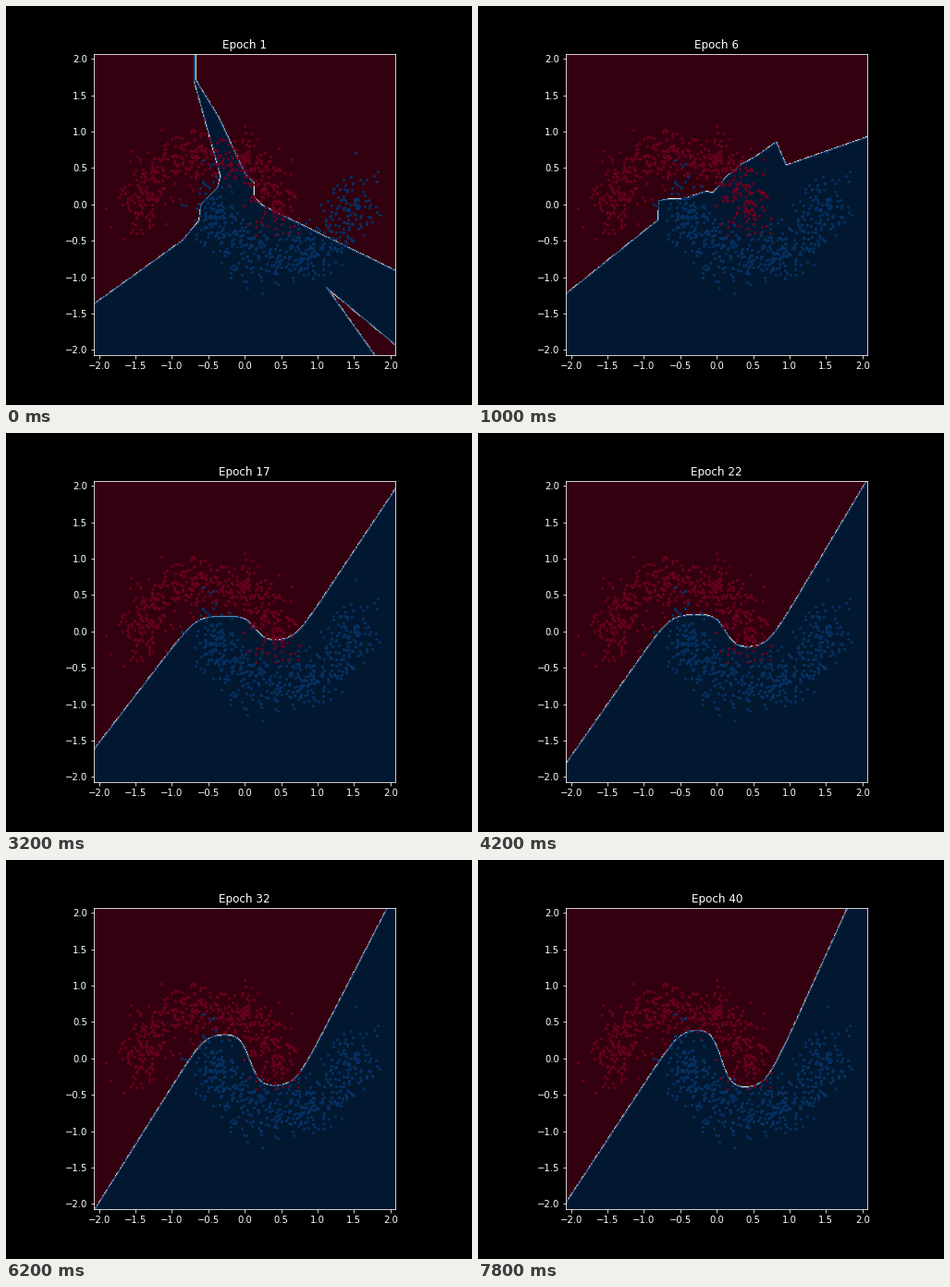
A matplotlib script that plays this animation: 504x432 px, repeating every 8000 ms.

```python
import numpy as np
import matplotlib.pyplot as plt
from matplotlib.animation import FuncAnimation

W, H, DPI = 504, 432, 72
LEFT, BOTTOM, SIDE = 95.2, 54.2, 326
LIM = 2.07
EPOCHS = 40

axis = np.linspace(-LIM, LIM, 415)
gx, gy = np.meshgrid(axis, axis)


def through(v, *points):
    """Piecewise linear function through (input, output) points."""
    return np.interp(v, *zip(*points))


# Every field is positive where the blue class is predicted.
def spike_field():
    left = through(gy, (-1.37, -2.07), (-0.5, -0.86), (-0.23, -0.63),
                   (0, -0.6), (0.24, -0.37), (0.39, -0.33), (1.72, -0.7))
    right = through(gy, (-0.91, 2.07), (-0.01, 0.23), (0.09, 0.13),
                    (0.3, 0.12), (0.43, 0), (1.2, -0.36), (1.72, -0.68))
    left = np.where(gy < -1.37, left + 1.4 * (gy + 1.37), left)
    right = np.where(gy < -0.91, right - 2 * (gy + 0.91), right)
    wedge = np.maximum(gy + 1.24 + 0.83 * (gx - 1.24),
                       -1.25 - 1.41 * (gx - 1.2) - gy)
    return np.minimum.reduce([gx - left, right - gx, wedge])


def strip_field():
    left = through(gy, (0.2, -0.15), (0.4, -0.32), (0.7, -0.32),
                   (0.86, -0.52), (2.07, -0.95))
    right = through(gy, (0.2, -0.13), (0.57, -0.1), (0.62, -0.02),
                    (1.08, -0.02), (2.07, -0.36))
    strip = np.minimum(gx - left, right - gx)
    floor = through(gx, (-2.07, -1.21), (-0.81, -0.32), (-0.79, 0.08),
                    (-0.45, 0.05), (-0.15, 0.2), (-0.05, 0.17),
                    (0.13, 0.5), (2.07, 0.4))
    roof = through(gx, (-0.05, 0.17), (0.13, 0.5), (0.34, 0.76), (1.05, 1.14))
    edge = 0.86 + 0.32 * (gy - 0.5)
    bump = np.minimum.reduce([roof - gy, edge - gx, gx + 0.05])
    return np.maximum.reduce([strip, floor - gy, bump])


def hinge(v, k=0.09):
    return k * np.logaddexp(0, v / k)


def wave_field(epoch):
    """Crest and trough joined by a soft step, with a slope on each side."""
    def key(*values):
        return np.interp(epoch, (10, 17, 28, 35, 39), values)

    crest = key(0.14, 0.21, 0.26, 0.39, 0.4)
    trough = key(0.12, -0.13, -0.34, -0.42, -0.41)
    rise_l, foot_l = key(1, 1.3, 1.58, 1.6, 1.52), key(-0.66, -0.66, -0.6, -0.5, -0.5)
    rise_r, foot_r = key(1.15, 1.5, 1.9, 1.97, 2.2), key(0.45, 0.68, 0.71, 0.68, 0.67)
    step = np.tanh((axis - key(0.14, 0.14, 0.09, 0.05, 0.06)) / 0.14)
    curve = (crest + trough - (crest - trough) * step) / 2
    curve += rise_r * hinge(axis - foot_r) - rise_l * hinge(foot_l - axis)
    return curve - gy


EARLY = [(1, spike_field()), (4, strip_field()), (10, wave_field(10))]


def field(epoch):
    for (t0, f0), (t1, f1) in zip(EARLY, EARLY[1:]):
        if epoch < t1:
            mix = (epoch - t0) / (t1 - t0)
            return (1 - mix) * f0 + mix * f1
    return wave_field(epoch)


def moons(n, noise, rng):
    t = np.linspace(0, np.pi, n)
    upper = np.column_stack([np.cos(t) - 0.5, np.sin(t) - 0.25])
    return [m + rng.normal(0, noise, m.shape).clip(-0.48, 0.48)
            for m in (upper, -upper)]


plt.style.use("dark_background")
fig = plt.figure(figsize=(W / DPI, H / DPI), dpi=DPI)
ax = fig.add_axes([LEFT / W, BOTTOM / H, SIDE / W, SIDE / H])
ticks = np.arange(-2, 2.1, 0.5)
ax.set(xlim=(-LIM, LIM), ylim=(-LIM, LIM), xticks=ticks, yticks=ticks)

cmap = plt.get_cmap("RdBu")
for pts, shade in zip(moons(500, 0.18, np.random.default_rng(7)), (0.0, 1.0)):
    ax.scatter(*pts.T, s=10, color=cmap(shade), linewidths=0, zorder=2)

levels = np.arange(-0.05, 1.1, 0.1)
fills = []


def draw(i):
    while fills:
        fills.pop().remove()
    label = (field(i + 1) > 0).astype(float)
    fills.append(ax.contourf(gx, gy, label, levels=levels, cmap=cmap,
                             vmin=0, vmax=1, alpha=0.5, zorder=1))
    ax.set_title(f"Epoch {i + 1}", fontsize=12)
    return fills


anim = FuncAnimation(fig, draw, frames=EPOCHS, interval=200,
                     repeat=True, repeat_delay=0, blit=False)
plt.show()
```
